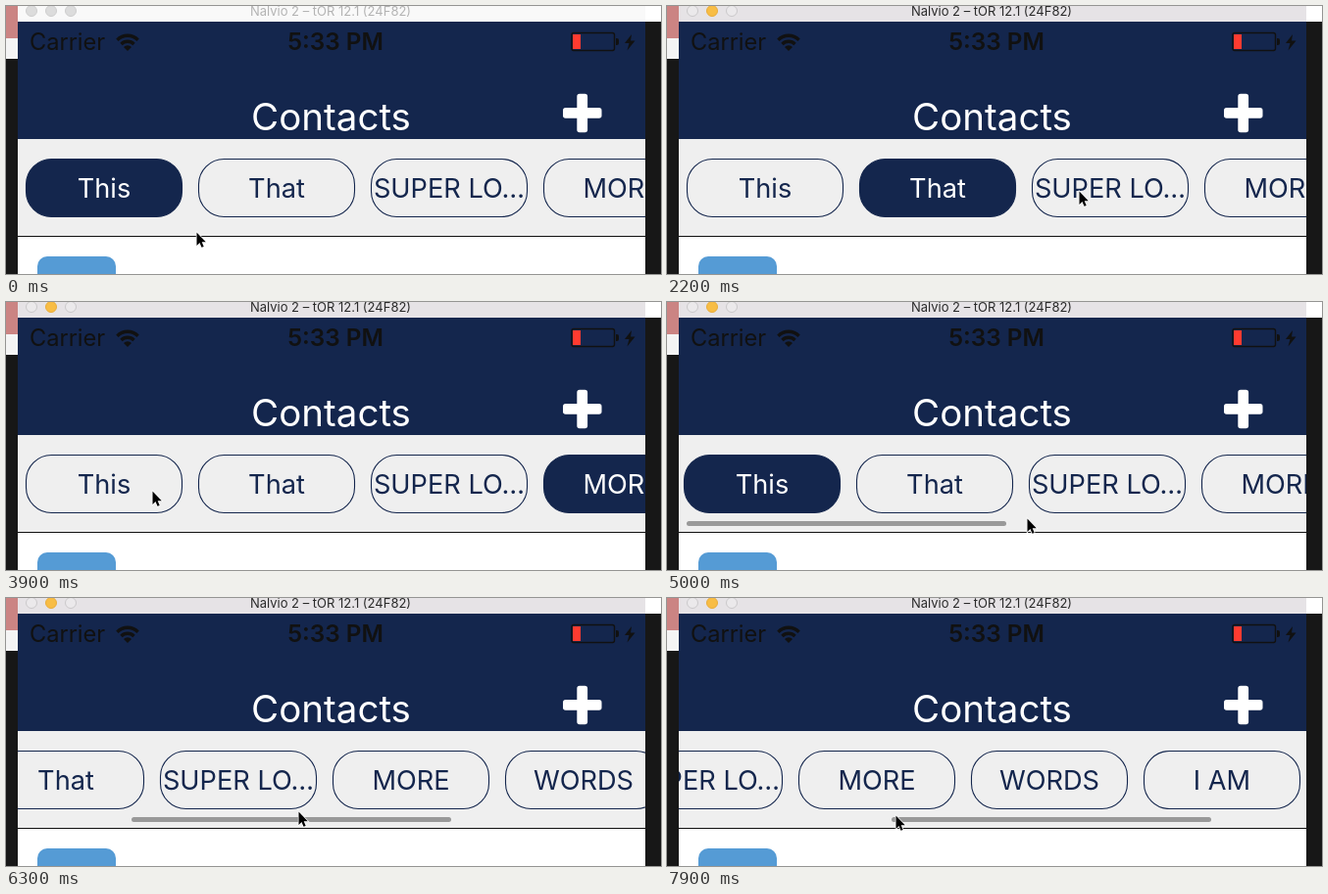
Recreate the animation shown at these times as an HTML page. Size 668 by 274 pixels, loop 8 s.

```html
<!DOCTYPE html>
<html lang="en">
<head>
<meta charset="utf-8">
<style>
  html, body { margin: 0; width: 100%; height: 100%; overflow: hidden; background: #171717; }
  svg { display: block; }
  text { font-family: Inter, "Open Sans", sans-serif; }
  .mid { text-anchor: middle; }
  .pill { fill: none; stroke: #14264d; stroke-width: 1.1; }
  .label { fill: #14264d; font-size: 27.2px; }
  .on .pill { fill: #14264d; }
  .on .label { fill: #fff; }
  .light { fill: #dcdcdc; stroke: #cfcfcf; }
  .bar { fill: #f9f9f9; }
  .title { fill: #b4b4b4; font-size: 13px; }
  .live .bar { fill: #e6e3e6; }
  .live .title { fill: #2b2b2b; }
  .live .light { fill: #ebe9eb; stroke: #cbc9cb; }
  .live .yellow { fill: #f8bd45; stroke: #e9ad3c; }
</style>
</head>
<body>
<svg id="stage" width="668" height="274" viewBox="0 0 668 274">
  <defs><clipPath id="screen"><path d="M12 0H652V274H12z"/></clipPath></defs>

  <!-- desktop behind the window -->
  <path fill="#cb8483" d="M0 0H12V33H0z"/>
  <path fill="#f4f4f4" d="M0 33H12V54H0z"/>
  <path fill="#fff" d="M652 0H668V16H652z"/>

  <!-- window and header -->
  <path class="bar" d="M12 0H652V16H12z"/>
  <circle class="light" cx="26" cy="5" r="5.5"/>
  <circle class="light yellow" cx="46" cy="5" r="5.5"/>
  <circle class="light" cx="66" cy="5" r="5.5"/>
  <text class="title mid" x="331" y="10">Nalvio 2 – tOR 12.1 (24F82)</text>
  <path fill="#14264d" d="M12 16H652V136H12z"/>
  <g fill="#111">
    <text x="24" y="45" font-size="23.6">Carrier</text>
    <text class="mid" x="336" y="45" font-size="24.3" font-weight="600">5:33 PM</text>
    <g transform="translate(124 46)" stroke="#111" stroke-width="3.4">
      <path d="M0 0L-4 -4A5.600 5.600 0 0 1 4 -4z" stroke="none"/>
      <path d="M-6.500 -7A9.200 9.200 0 0 1 6.500 -7M-10.600 -11.300A15 15 0 0 1 10.600 -11.300" fill="none"/>
    </g>
    <rect x="577" y="27.500" width="43.500" height="18" rx="2" fill="none" stroke="#111" stroke-width="1.400"/>
    <path d="M622 33h1a2 2 0 0 1 2 2v3a2 2 0 0 1-2 2h-1z"/>
    <path d="M638 29l-7 9h4.500l-2 7.500 8-10h-4.500z"/>
  </g>
  <path fill="#ff3b30" d="M578 29h8v15h-8z"/>
  <text class="mid" x="331.500" y="127" font-size="38.5" fill="#fff">Contacts</text>
  <g fill="#fff">
    <rect x="568" y="104" width="39.500" height="10.800" rx="2.700"/>
    <rect x="582.300" y="89.700" width="10.800" height="39.500" rx="2.700"/>
  </g>

  <!-- filter strip and list -->
  <path fill="#efefef" d="M12 136H652V235H12z"/>
  <path fill="#fff" d="M12 236H652V274H12z"/>
  <path fill="#111" d="M12 235H652V236H12z"/>
  <rect x="32" y="256" width="80" height="30" rx="10" fill="#559bd5"/>
  <g clip-path="url(#screen)"><g id="pills"></g></g>
  <rect id="scrollbar" y="224" width="326" height="5" rx="2.500" fill="#999"/>
  <path id="cursor" d="M0 0V13.500L3 10.600 5 15.300 7.200 14.400 5.200 9.800H9.300z" stroke="#fff" stroke-width="1.400" paint-order="stroke"/>
</svg>
<script>
const LOOP = 8000, STEP = 100;
const LEFT = 20, PITCH = 176;
const TAP_DELAY = 200;
const $ = id => document.getElementById(id);
const clamp = k => Math.max(0, Math.min(1, k));
const smooth = k => k * k * (3 - 2 * k);
const out = k => k * (2 - k);

// The pointer glides from stop to stop. A tap picks the pill under it;
// a drag pulls the strip along, and glide is what it coasts on afterwards.
const moves = [
  { start: 0, end: 1500, x: 276, y: 195, tap: true },
  { start: 1800, end: 2200, x: 420, y: 189, tap: true },
  { start: 2400, end: 3000, x: 585, y: 192, tap: true },
  { start: 3300, end: 3900, x: 149, y: 193, tap: true },
  { start: 4200, end: 4800, x: 370, y: 221, },
  { start: 4900, end: 5600, x: 205, y: 217, drag: k => k ** 2, glide: 53 },
  { start: 5900, end: 6800, x: 429, y: 220 },
  { start: 6900, end: 7800, x: 233, y: 222, drag: k => k ** 0.8, glide: 0 }
];

$("pills").innerHTML = ["This", "That", "SUPER LO…", "MORE", "WORDS", "I AM"].map((name, i) =>
  `<g transform="translate(${LEFT + PITCH * i} 156)">
    <rect class="pill" x=".5" y=".5" width="159" height="59" rx="26"/>
    <text class="label mid" x="80" y="40">${name}</text>
  </g>`).join("");
const pills = [...$("pills").children];

function stateAt(t) {
  const state = { x: 194, y: 231, scroll: 0, selected: 0, bar: 0 };
  for (const { start, end, x, y, tap, drag, glide } of moves) {
    if (t < start) break;
    const k = (drag || smooth)(clamp((t - start) / (end - start)));
    const dx = (x - state.x) * k;
    state.x += dx;
    state.y += (y - state.y) * k;
    if (tap && t >= end + TAP_DELAY) state.selected = Math.floor((x - LEFT) / PITCH);
    if (drag) {
      state.scroll += glide * out(clamp((t - end) / 900)) - dx;
      state.bar = t > start ? clamp((end + 1100 - t) / 300) : 0;
    }
  }
  return state;
}

function draw(t) {
  const { x, y, scroll, selected, bar } = stateAt(t);
  $("stage").classList.toggle("live", t >= 1000);
  pills.forEach((pill, i) => pill.classList.toggle("on", i === selected));
  $("pills").setAttribute("transform", `translate(${-Math.round(scroll)} 0)`);
  $("scrollbar").setAttribute("x", Math.round(18 + 0.51 * scroll));
  $("scrollbar").setAttribute("opacity", bar);
  $("cursor").setAttribute("transform", `translate(${Math.round(x) + 0.5} ${Math.round(y) + 0.5})`);
}

function tick() {
  draw(Math.floor(performance.now() % LOOP / STEP) * STEP);
  requestAnimationFrame(tick);
}
tick();
</script>
</body>
</html>
```
